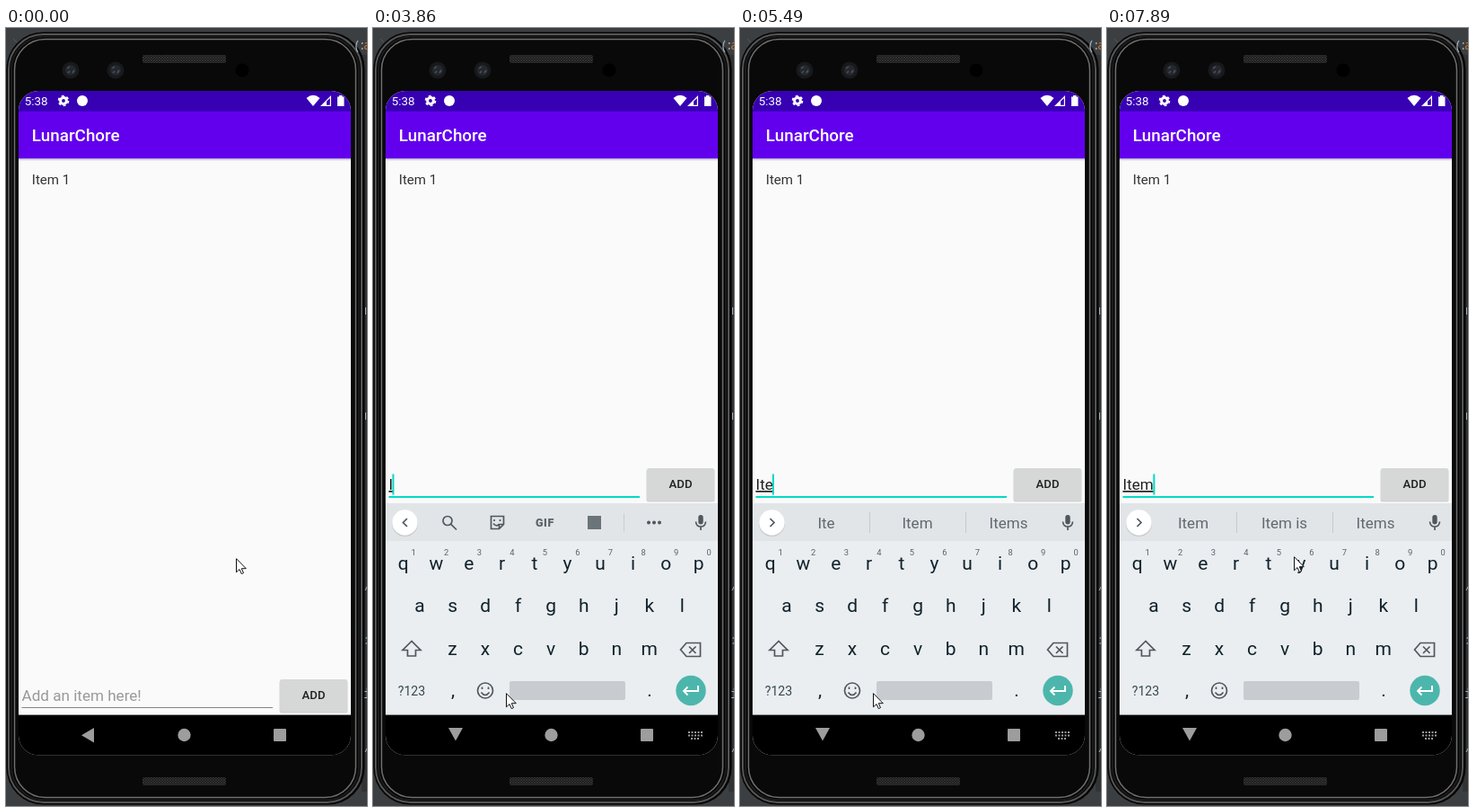
Recreate the animation shown at these times as an HTML page. Size 402 px wide and 866 px high, loop 8 s.

```html
<!DOCTYPE html>
<html lang="en">
<head>
<meta charset="utf-8">
<title>To-do app in a phone</title>
<style>
html, body { margin: 0; width: 100%; height: 100%; overflow: hidden; background: #3c3f41; }
svg { display: block; width: 402px; height: 866px; font-family: Roboto, sans-serif; }
.mid { text-anchor: middle; }
.rim { fill: none; }
.line { fill: none; stroke: #4f585e; stroke-width: 1.7; }
.key { font-size: 21px; fill: #11222b; }
.num { font-size: 9.4px; fill: #56636a; }
.tip { font-size: 17px; fill: #60696f; }
.entry { font-size: 17.1px; }
.word { fill: #212121; text-decoration: underline; text-decoration-thickness: 1px; }

/* every change is a hard cut in one 8 s loop: percent = ms / 80 */
.a { animation: 8s step-end infinite; }
#pointer { animation-name: pointer; }
#form { animation-name: form; }
#caret { animation-name: caret; }
#keys { animation-name: keys; }
.idle { animation-name: idle; }
.focus { animation-name: focus; }
.navUp { animation-name: navUp; }
.navDown { animation-name: navDown; }
.hint { animation-name: hint; }
.tools { animation-name: tools; }
.strip { animation-name: strip; }
.w1 { animation-name: w1; }
.s1 { animation-name: s1; }
.w2 { animation-name: w2; }
.w3 { animation-name: w3; }
.w4 { animation-name: w4; }

@keyframes pointer {
  0% { transform: translate(256px, 590px); }
  17.125% { transform: translate(254px, 624px); }
  19% { transform: translate(220px, 674px); }
  20.875% { transform: translate(149px, 744px); }
  22.875% { transform: translate(148px, 744px); }
  26.375% { transform: translate(148px, 742px); }
  28% { transform: translate(148px, 740px); }
  91.75% { transform: translate(152px, 732px); }
  93.25% { transform: translate(166px, 709px); }
  94.875% { transform: translate(188px, 674px); }
  96.75% { transform: translate(206px, 596px); }
  98.625%, 100% { transform: translate(208px, 588px); }
}
@keyframes form {
  0% { transform: none; }
  36.75%, 100% { transform: translateY(-235px); }
}
@keyframes keys {
  0% { opacity: 0; transform: translateY(60px); }
  36.75% { opacity: 1; transform: translateY(60px); }
  38.25%, 100% { opacity: 1; transform: none; }
}
@keyframes caret {
  0% { opacity: 0; transform: translateX(17px); }
  29.75% { opacity: 1; transform: translateX(17px); }
  36.75% { opacity: 0; transform: translateX(17px); }
  41.625% { opacity: 1; transform: translateX(17px); }
  48.25% { opacity: 1; transform: translateX(21.5px); }
  54.75% { opacity: 0; transform: translateX(21.5px); }
  61.75% { opacity: 1; transform: translateX(21.5px); }
  65.125% { opacity: 1; transform: translateX(27px); }
  68.625% { opacity: 1; transform: translateX(36px); }
  70.125% { opacity: 1; transform: translateX(51.4px); }
  76.75% { opacity: 0; transform: translateX(51.4px); }
  83.75% { opacity: 1; transform: translateX(51.4px); }
  90.25% { opacity: 0; transform: translateX(51.4px); }
  96.75%, 100% { opacity: 1; transform: translateX(51.4px); }
}
@keyframes idle { 0% { opacity: 1; } 29.75%, 100% { opacity: 0; } }
@keyframes focus { 0% { opacity: 0; } 29.75%, 100% { opacity: 1; } }
@keyframes navUp { 0% { opacity: 1; } 36.75%, 100% { opacity: 0; } }
@keyframes navDown { 0% { opacity: 0; } 36.75%, 100% { opacity: 1; } }
@keyframes hint { 0% { opacity: 1; } 48.25%, 100% { opacity: 0; } }
@keyframes tools { 0% { opacity: 1; } 49.75%, 100% { opacity: 0; } }
@keyframes strip { 0% { opacity: 0; } 49.75%, 100% { opacity: 1; } }
@keyframes w1 { 0% { opacity: 0; } 48.25% { opacity: 1; } 65.125%, 100% { opacity: 0; } }
@keyframes s1 { 0% { opacity: 0; } 49.75% { opacity: 1; } 65.125%, 100% { opacity: 0; } }
@keyframes w2 { 0% { opacity: 0; } 65.125% { opacity: 1; } 68.625%, 100% { opacity: 0; } }
@keyframes w3 { 0% { opacity: 0; } 68.625% { opacity: 1; } 70.125%, 100% { opacity: 0; } }
@keyframes w4 { 0% { opacity: 0; } 70.125%, 100% { opacity: 1; } }
</style>
</head>
<body>
<svg viewBox="0 0 402 866">
  <defs>
    <clipPath id="screen"><rect x="14" y="70" width="370" height="739.500" rx="22"/></clipPath>
    <clipPath id="app"><rect x="14" y="93" width="370" height="672"/></clipPath>
    <linearGradient id="drop" x2="0" y2="1">
      <stop stop-color="#000" stop-opacity=".22"/><stop offset="1" stop-color="#000" stop-opacity="0"/>
    </linearGradient>
    <pattern id="mesh" width="3" height="3" patternUnits="userSpaceOnUse">
      <rect width="3" height="3" fill="#1b1b1b"/><path d="M0 0L3 3M3 0L0 3" stroke="#393939" stroke-width=".7"/>
    </pattern>
    <g id="lens">
      <circle r="9.500" fill="#17191c"/><circle r="6" fill="#24282d"/>
      <path d="M-4 -2L-1 -4M2 3L4 0M-3 3L-1 1" stroke="#4d555d" stroke-width="1.5"/>
    </g>
  </defs>

  <!-- editor behind the phone -->
  <rect width="402" height="866" fill="#3c3f41"/>
  <path d="M0 40H4V830H0ZM396 30H402V850H396Z" fill="#313335"/>
  <path d="M8 12L13 17" stroke="#555"/>

  <!-- phone body -->
  <rect x=".5" y="4.500" width="399" height="860" rx="41" fill="#050505"/>
  <rect class="rim" x="3" y="7" width="393" height="855" rx="39" stroke="#565656" stroke-width="2"/>
  <rect class="rim" x="6" y="9.500" width="387" height="850" rx="37" stroke="#1c1c1c" stroke-width="2"/>
  <rect x="9.500" y="12.500" width="380" height="844" rx="34" fill="#090909" stroke="#707070" stroke-width="1.5"/>
  <rect x="152" y="30" width="93" height="9" rx="2" fill="url(#mesh)"/>
  <rect x="152" y="834" width="93" height="9" rx="2" fill="url(#mesh)"/>
  <use href="#lens" x="72" y="47"/>
  <use href="#lens" x="122" y="47"/>
  <circle cx="263" cy="47" r="7.500" fill="#000"/>
  <g font-family="Noto Sans Mono, monospace" font-size="14" fill="#a9b7c6">
    <text x="386.500" y="24">(<tspan x="392.500">:</tspan><tspan x="398" fill="#cc7832">a</tspan></text>
    <text x="397" y="686" fill="#6897bb">:</text>
    <text x="398" y="746">i</text>
    <path d="M400.500 311V319M400.500 428V436M400 626L402 622M400 806L402 802" stroke="#a9b7c6"/>
  </g>

  <g clip-path="url(#screen)">
    <rect x="14" y="70" width="370" height="739.500" fill="#fafafa"/>
    <rect x="14" y="145.300" width="370" height="3" fill="url(#drop)"/>
    <rect x="14" y="70" width="370" height="23" fill="#3700b3"/>
    <rect x="14" y="92.700" width="370" height="52.600" fill="#6200ee"/>

    <!-- status bar -->
    <g fill="#fff">
      <text x="20.800" y="86.200" font-size="13.4">5:38</text>
      <circle cx="64" cy="81" r="3.400" fill="none" stroke="#fff" stroke-width="3"/>
      <circle cx="64" cy="81" r="5.400" fill="none" stroke="#fff" stroke-width="1.8" stroke-dasharray="2.83"/>
      <circle cx="85" cy="81" r="6"/>
      <path d="M334.500 78Q342 71.500 349.500 78L342 87Z"/>
      <path d="M351.500 86.400H361.400V76.500Z" fill="none" stroke="#fff" stroke-width="1.2"/>
      <path d="M351 87L357 81V87Z"/>
      <path d="M369 76.500H371V75H374.500V76.500H376.500V87H369Z"/>
      <text x="28.800" y="126" font-size="18.84" font-weight="500">LunarChore</text>
    </g>
    <text x="28.800" y="174" font-size="15.07" fill="#343434">Item 1</text>

    <g clip-path="url(#app)">
      <g id="form" class="a">
        <text class="entry a hint" x="17.500" y="749" fill="#999">Add an item here!</text>
        <text class="entry word a w1" x="17.500" y="749">I</text>
        <text class="entry word a w2" x="17.500" y="749">It</text>
        <text class="entry word a w3" x="17.500" y="749">Ite</text>
        <text class="entry word a w4" x="17.500" y="749">Item</text>
        <rect class="a idle" x="17.500" y="756" width="279.500" height="1" fill="#858585"/>
        <rect class="a focus" x="17.500" y="756" width="279.500" height="2" fill="#03dac5"/>
        <rect id="caret" class="a" y="731.500" width="2" height="23" fill="#03dac5"/>
        <rect x="304.500" y="726" width="76" height="36.500" rx="2.500" fill="#000" opacity=".16"/>
        <rect x="305" y="725" width="75" height="36" rx="2" fill="#d6d7d7"/>
        <text class="mid" x="342.500" y="747" font-size="13.2" font-weight="500" fill="#222">ADD</text>
      </g>

      <g id="keys" class="a">
        <rect x="14" y="529" width="370" height="236" fill="#eaeef1"/>
        <rect x="14" y="529" width="370" height="42" fill="#e1e5e8"/>
        <circle cx="35.500" cy="551.500" r="14.500" fill="#000" opacity=".13"/>
        <circle cx="35.500" cy="550.500" r="14.200" fill="#fff"/>
        <g class="a tools">
          <path class="line" d="M38 546L33.500 550.500L38 555"/>
          <circle class="line" cx="83" cy="548.500" r="5"/>
          <path class="line" d="M86.800 552.300L93 558.500" stroke-width="2"/>
          <path class="line" d="M131.500 543.500H145.500V552.500L140.500 557.500H131.500ZM145 552.500H140.500V557M134 551.500Q137.500 555.500 140 552.500M135 547V549M141.500 547V549"/>
          <text class="mid" x="191.500" y="554.500" font-size="12.5" font-weight="800" fill="#5a636a" letter-spacing=".7">GIF</text>
          <rect x="239" y="543" width="15" height="15" fill="#6b7479"/>
          <path d="M279.500 540V561" stroke="#c8cdd1"/>
          <path d="M307 550.500h.01M313 550.500h.01M319 550.500h.01" stroke="#4f585e" stroke-width="4" stroke-linecap="round"/>
        </g>
        <g class="a strip">
          <path class="line" d="M33.500 546L38 550.500L33.500 555"/>
          <path d="M144.500 539V562M251.500 539V562" stroke="#c5cace"/>
        </g>
        <g class="tip mid">
          <g class="a s1"><text x="96" y="557">I</text><text x="197.500" y="557">I'm</text><text x="299" y="557">If</text></g>
          <g class="a w2"><text x="96" y="557">It</text><text x="197.500" y="557">It's</text><text x="299" y="557">Its</text></g>
          <g class="a w3"><text x="96" y="557">Ite</text><text x="197.500" y="557">Item</text><text x="299" y="557">Items</text></g>
          <g class="a w4"><text x="96" y="557">Item</text><text x="197.500" y="557">Item is</text><text x="299" y="557">Items</text></g>
        </g>
        <rect x="362.300" y="542" width="5.400" height="10.500" rx="2.700" fill="#4f585e"/>
        <path class="line" d="M359.500 549.500Q360 555 365 555Q370 555 370.500 549.500M365 555V559"/>

        <g id="letters" class="mid"></g>
        <path class="line" d="M43 682.500L33 692.500H38.500V699H47.500V692.500H53Z"/>
        <path class="line" d="M349 684.500H364.500V699.500H349L342.500 692ZM352 688.500L359.500 696M359.500 688.500L352 696"/>
        <text class="mid" x="43" y="742.500" font-size="14.2" fill="#37474f">?123</text>
        <text class="key mid" x="89" y="744">,</text>
        <text class="key mid" x="308" y="744">.</text>
        <circle class="line" cx="125" cy="737.500" r="8.500"/>
        <path class="line" d="M120.500 739.500Q125 745.500 129.500 739.500M121.500 733.500V736M128.500 733.500V736"/>
        <rect x="152" y="727" width="129" height="21" rx="2" fill="#c8ccd0"/>
        <circle cx="354" cy="737.500" r="16.700" fill="#4db6ac"/>
        <path d="M362 732V738H346.500M350.500 733.500L346 738L350.500 742.500" fill="none" stroke="#fff" stroke-width="1.9"/>
      </g>
    </g>

    <!-- navigation bar -->
    <rect x="14" y="764.600" width="370" height="45" fill="#000"/>
    <g fill="#9d9d9d">
      <path class="a navUp" d="M84 787.300L98 779V795.500Z"/>
      <path class="a navDown" d="M84 779H100L92 793.500Z"/>
      <circle cx="198.500" cy="787" r="7.200"/>
      <rect x="298" y="780" width="14" height="14" rx="1"/>
      <path class="a navDown" d="M351 784H367M351 787.500H367M354 791H363" stroke="#9d9d9d" stroke-width="1.8" stroke-dasharray="2 1.5"/>
    </g>
  </g>

  <path id="pointer" class="a" d="M.5 .7V15.800L4 12.600L6.300 17.600L8.500 16.600L6.300 11.700H11.300Z" fill="#fff" stroke="#111" stroke-width="1"/>
</svg>

<script>
const letters = document.getElementById('letters');
const pitch = 36.55;

function label(cls, x, y, char) {
  const el = document.createElementNS('http://www.w3.org/2000/svg', 'text');
  el.setAttribute('class', cls);
  el.setAttribute('x', x);
  el.setAttribute('y', y);
  el.textContent = char;
  letters.append(el);
}

function row(chars, x, y, cls = 'key') {
  [...chars].forEach((char, i) => label(cls, x + i * pitch, y, char));
}

row('qwertyuiop', 33.8, 602.5);
row('1234567890', 45.2, 587, 'num');
row('asdfghjkl', 52, 650);
row('zxcvbnm', 88.5, 697.5);
</script>
</body>
</html>
```
